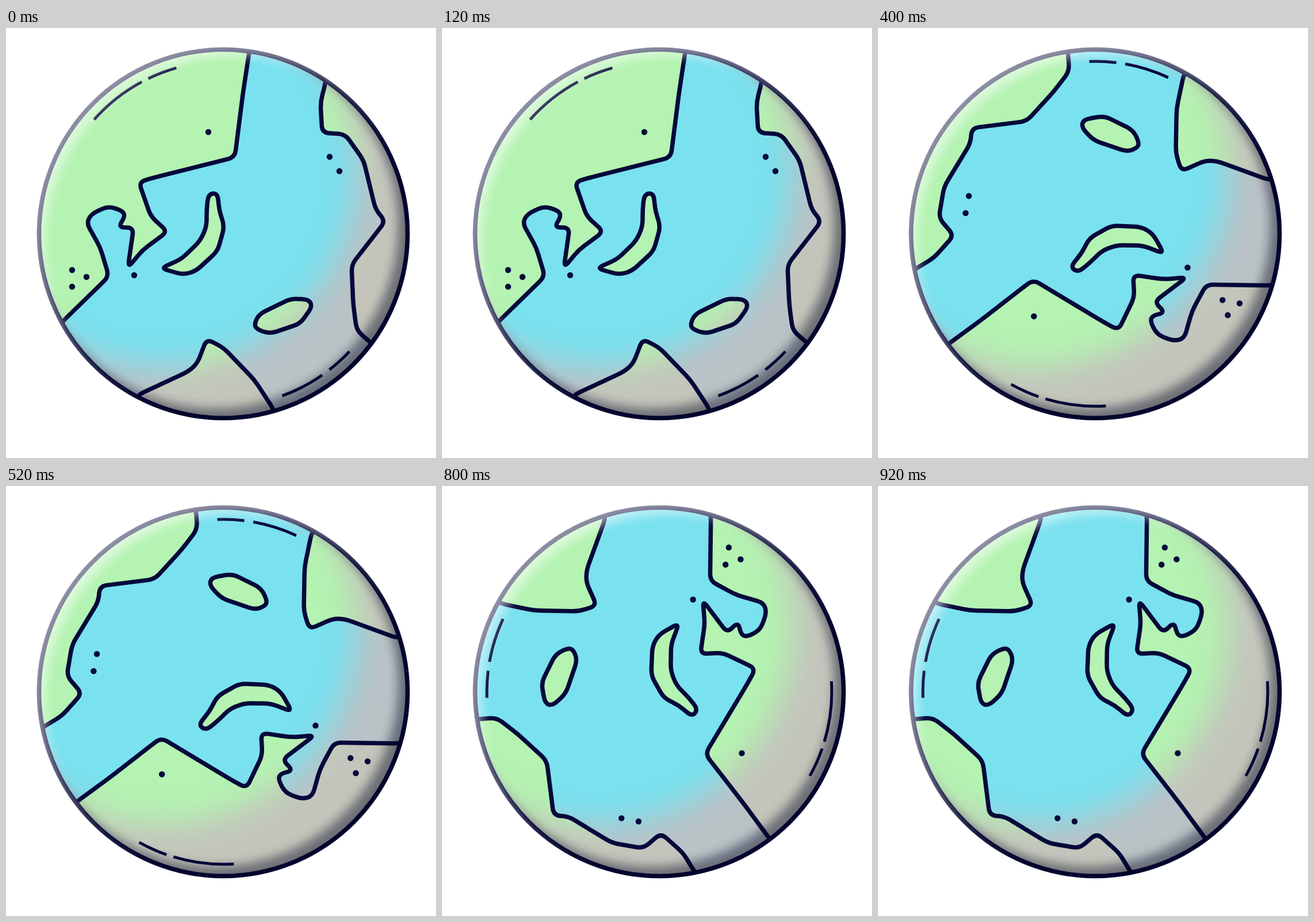
Write an HTML page that moves like this. It is 748 px wide and 748 px high and loops after 1 s.

```html
<!DOCTYPE html>
<html lang="en">
<head>
<meta charset="utf-8">
<title>Turning globe</title>
<style>
  html, body { margin: 0; width: 100%; height: 100%; overflow: hidden; background: #fff; }
  svg { display: block; width: 100%; height: 100%; }
  .land { fill: #b4f3b1; }
  .ink { fill: none; stroke: #06083a; stroke-width: 7.5; stroke-linejoin: round; stroke-linecap: round; }
  .dash { stroke-width: 5; stroke-linecap: butt; }
  .dots { stroke-width: 10.5; }
  .ring { fill: none; stroke-width: 600; }
  .grey { stroke: #c6bcbe; opacity: .85; filter: blur(28px); }
  .dark { stroke: #00031f; opacity: .45; filter: blur(9px); }
  .glow { stroke: #fff; opacity: .55; filter: blur(9px); }
</style>
</head>
<body>
<svg viewBox="0 0 748 748">
  <defs>
    <clipPath id="disc"><circle cx="378" cy="358" r="320"/></clipPath>
    <clipPath id="rim"><circle cx="378" cy="358" r="324.5"/></clipPath>
    <path id="coast"/>
  </defs>

  <g clip-path="url(#disc)">
    <path fill="#7ae1ef" d="M0 0H748V748H0Z"/>
    <g class="spin"><use href="#coast" class="land"/></g>
    <circle class="ring grey" cx="270" cy="250" r="640"/>
    <g class="spin"><use href="#coast" class="ink"/></g>
  </g>

  <circle class="ink" cx="378" cy="358" r="320.5"/>
  <g class="spin">
    <circle class="ink dash" cx="378" cy="358" r="300" pathLength="360"
      stroke-dasharray="9 3 15 151.5 20.3 2.4 10 148.8" stroke-dashoffset="-43"/>
    <path class="ink dots" d="M352 181h0M563 224h0M580 249h0M115 421h0M140 433h0M115 450h0M223 430h0"/>
  </g>

  <!-- Light stays in place while the globe turns -->
  <g clip-path="url(#rim)">
    <circle class="ring dark" cx="364" cy="344" r="618"/>
    <circle class="ring glow" cx="396" cy="376" r="628"/>
  </g>
</svg>
<script>
const STEP = 200, CORNER = 12;
const angles = [0, -45, -135, -180, -225];

// Corner points; coasts that meet the rim are closed outside the disc.
const shapes = [
  '424,36 412,115 398,225 258,260 231,268 252,328 281,354 238,386 212,417 222,347 195,347 207,328 203,318 178,310 149,323 140,339 164,382 179,432 98,511 60,560 -40,560 -40,-20 424,-20',
  '557,90 547,130 550,182 590,185 622,230 643,316 660,336 601,412 604,480 610,526 633,546 720,620 760,0 560,40',
  '228,639 318,597 333,583 349,541 378,556 432,612 466,664 470,720 200,720',
  '352,289 368,287 371,318 380,345 368,388 330,423 308,429 269,418 305,402 338,370 349,345 349,315',
  '432,515 440,498 495,471 526,472 533,484 512,514 459,532 436,524'
];

function rounded(text) {
  const pts = text.split(' ').map(p => p.split(',').map(Number));
  const toward = ([x, y], [u, v]) => {
    const t = Math.min(0.5, CORNER / Math.hypot(u - x, v - y));
    return [x + (u - x) * t, y + (v - y) * t];
  };
  return pts.map((p, i) => {
    const before = pts.at(i - 1), after = pts[(i + 1) % pts.length];
    return `${i ? 'L' : 'M'}${toward(p, before)}Q${p} ${toward(p, after)}`;
  }).join('') + 'Z';
}
document.getElementById('coast').setAttribute('d', shapes.map(rounded).join(''));

const spinners = document.querySelectorAll('.spin');
const start = performance.now();

function tick() {
  const pose = Math.floor((performance.now() - start) / STEP) % angles.length;
  for (const s of spinners) s.setAttribute('transform', `rotate(${angles[pose]} 378 358)`);
  requestAnimationFrame(tick);
}
tick();
</script>
</body>
</html>
```
